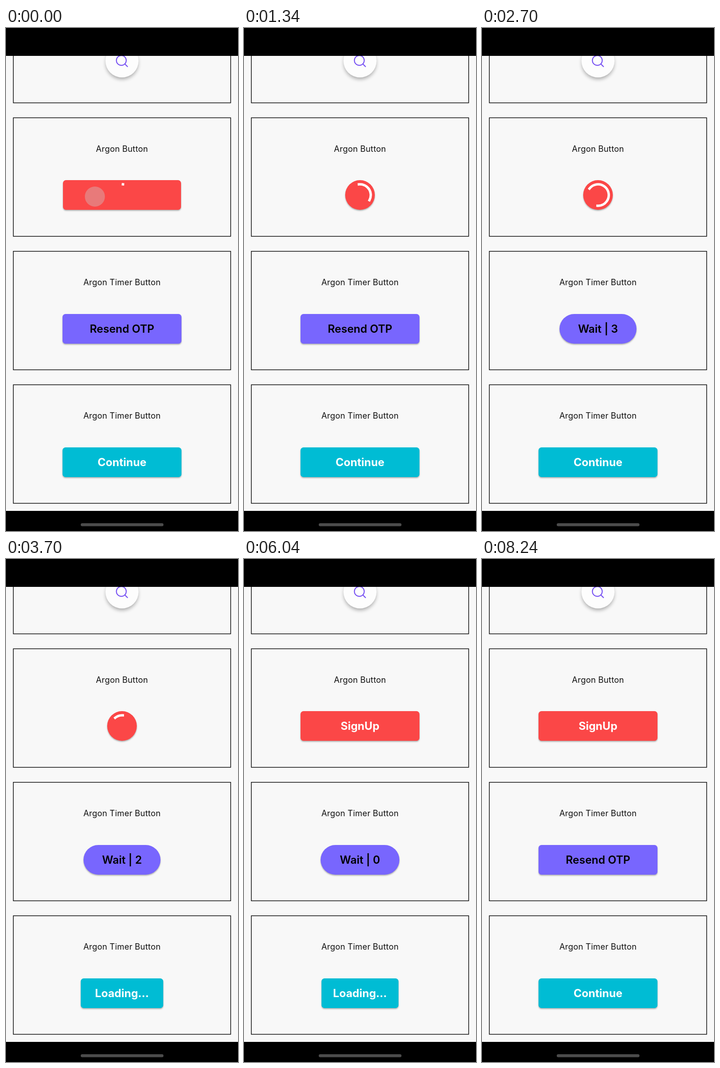
These frames come from a looping animation (509 px wide and 1101 px high, 8260 ms). An HTML page:

```html
<!DOCTYPE html>
<html lang="en">
<head>
<meta charset="utf-8">
<title>Argon buttons</title>
<style>
  html, body { margin: 0; width: 100%; height: 100%; overflow: hidden; background: #000; }
  #stage { position: relative; width: 509px; height: 1101px; overflow: hidden; font-family: Inter, sans-serif; }
  #scene { position: absolute; inset: 0; }
  .title, .label { position: absolute; left: 0; right: 0; text-align: center; white-space: pre; }
  .title { font-size: 18px; letter-spacing: .2px; line-height: 24px; color: #111; }
  .button { position: absolute; height: 65.2px; overflow: hidden; box-shadow: 0 2px 3px rgba(0, 0, 0, .3); }
  .label { left: -100px; right: -100px; font-size: 24px; line-height: 65.2px; }
  .splash { position: absolute; border-radius: 50%; background: rgb(200, 200, 200); }
  .spinner { position: absolute; left: 50%; top: 0; margin-left: -32.6px; }
</style>
</head>
<body>
<div id="stage">
  <svg id="scene" width="509" height="1101">
    <defs>
      <filter id="soft" x="-50%" y="-50%" width="200%" height="200%"><feGaussianBlur stdDeviation="4.5"/></filter>
      <clipPath id="screen"><rect y="61" width="509" height="996"/></clipPath>
    </defs>
    <g clip-path="url(#screen)">
      <rect y="61" width="509" height="996" fill="#f8f8f8"/>
      <g fill="none" stroke="#000" stroke-width="1.4">
        <rect x="16.1" y="-95.7" width="476.8" height="259.5"/>
        <rect x="16.1" y="196.5" width="476.8" height="259.5"/>
        <rect x="16.1" y="488.7" width="476.8" height="259.5"/>
        <rect x="16.1" y="780.9" width="476.8" height="259.5"/>
      </g>
      <circle cx="254.5" cy="77" r="35" fill="#000" opacity=".33" filter="url(#soft)"/>
      <circle cx="254.5" cy="72" r="36.3" fill="#fdfdfd"/>
      <g fill="none" stroke="#7048f2" stroke-width="2" stroke-linecap="round">
        <circle cx="253" cy="71" r="10.8"/>
        <path d="M260.8 78.8 L266.5 84.5"/>
      </g>
    </g>
    <rect x="164" y="1084" width="181.500" height="6.400" rx="3.2" fill="#4c4c4c"/>
  </svg>
</div>
<script>
const FULL = 261, HEIGHT = 65.2, CENTER = 254.5;
const SHRINK = 450, ROUNDING = 200, LOOP = 8260;

const clamp = x => Math.min(1, Math.max(0, x));

function bezier(x1, y1, x2, y2) {
  const at = (a, b, s) => 3 * (1 - s) ** 2 * s * a + 3 * (1 - s) * s * s * b + s ** 3;
  return x => {
    if (x <= 0 || x >= 1) return clamp(x);
    let low = 0, high = 1;
    for (let i = 0; i < 22; i++) {
      const mid = (low + high) / 2;
      if (at(x1, x2, mid) < x) low = mid; else high = mid;
    }
    return at(y1, y2, low);
  };
}
const easeInOutCirc = bezier(.785, .135, .15, .86);
const fastOutSlowIn = bezier(.4, 0, .2, 1);

// Playback: short frames linger for 100 ms, except inside still passages.
const frames = [];
let length = 0, appTime = 0;
for (let i = 0; i < 295; i++) {
  const nth = Math.ceil((i - 4.7) * 7 / 60);
  const short = Math.floor(nth * 60 / 7 + 4.7) === i;
  const still = (i >= 193 && i < 206) || (i >= 245 && i < 267);
  frames.push({ start: length, appTime });
  length += !short ? 20 : still ? 10 : 100;
  appTime += short ? 10 : 20;
}

const buttons = [
  { title: 'Argon Button', idle: 'SignUp', busy: () => '', spins: true,
    color: '#fb4747', ink: '#fff', weight: 700, min: HEIGHT, round: true, begin: -20, end: 2980 },
  { title: 'Argon Timer Button', idle: 'Resend OTP',
    busy: t => 'Wait | ' + Math.max(0, 3 - Math.floor((t - 895) / 1000)),
    color: '#7866fe', ink: '#000', weight: 600, min: 169.7, round: true, begin: 895, end: 3895 },
  { title: 'Argon Timer Button', idle: 'Continue', busy: () => 'Loading...',
    color: '#00bcd4', ink: '#fff', weight: 700, min: 169.7, round: false, begin: 2050, end: 4050 }
];

const stage = document.getElementById('stage');
function add(parent, className, style) {
  const node = document.createElement('div');
  node.className = className;
  Object.assign(node.style, style);
  return parent.appendChild(node);
}

buttons.forEach((b, i) => {
  const top = 195.9 + i * 292.2;
  add(stage, 'title', { top: top + 57 + 'px' }).textContent = b.title;
  b.box = add(stage, 'button', { top: top + 137.4 + 'px', background: b.color });
  b.splash = add(b.box, 'splash', {});
  b.label = add(b.box, 'label', { color: b.ink, fontWeight: b.weight });
  if (b.spins) {
    b.box.insertAdjacentHTML('beforeend',
      `<svg class="spinner" width="65.2" height="65.2"><circle cx="32.6" cy="32.6" r="23.5" pathLength="360"
        fill="none" stroke="#fff" stroke-width="5.3" stroke-linecap="square"/></svg>`);
    b.spinner = b.box.lastChild;
    b.arc = b.spinner.firstChild;
  }
});

// Corner radius trails the width and settles after it stops.
function trailing(d) {
  return d < SHRINK ? .2 * clamp((d - 225) / 225) : .2 + .8 * fastOutSlowIn((d - SHRINK) / ROUNDING);
}

function drawSpinner(arc, t) {
  const phase = t / 1333 % 1;
  const head = fastOutSlowIn(phase * 2), tail = fastOutSlowIn(phase * 2 - 1);
  const start = -90 + tail * 270 + t / 2222 * 360 + phase * 90;
  arc.setAttribute('stroke-dasharray', `${Math.max(.06, (head - tail) * 270)} 360`);
  arc.setAttribute('transform', `rotate(${start} 32.6 32.6)`);
}

function drawButton(b, t) {
  const busy = t >= b.begin && t < b.end + SHRINK;
  const shrink = easeInOutCirc(t < b.end ? (t - b.begin) / SHRINK : 1 - (t - b.end) / SHRINK);
  const width = FULL + (b.min - FULL) * shrink;
  const roundness = b.round ? trailing(t - b.begin) - trailing(t - b.end) : 0;
  b.box.style.left = CENTER - width / 2 + 'px';
  b.box.style.width = width + 'px';
  b.box.style.borderRadius = 6.5 + 26.1 * roundness + 'px';

  const text = busy ? b.busy(t) : b.idle;
  if (b.label.textContent !== text) b.label.textContent = text;

  const age = t - b.begin;
  const radius = 195 * clamp((age - 3) / 150);
  Object.assign(b.splash.style, {
    left: 70 - radius + 'px', top: 35.7 - radius + 'px',
    width: radius * 2 + 'px', height: radius * 2 + 'px',
    opacity: age < 0 ? 0 : .43 * (1 - clamp(age / 200))
  });

  if (b.spins) {
    b.spinner.style.display = busy ? '' : 'none';
    drawSpinner(b.arc, t - b.begin);
  }
}

function render(now) {
  const time = now % LOOP;
  const frame = frames.findLast(f => f.start <= time);
  buttons.forEach(b => drawButton(b, frame.appTime));
}

const origin = performance.now();
function tick() {
  render(performance.now() - origin);
  requestAnimationFrame(tick);
}
tick();
</script>
</body>
</html>
```
